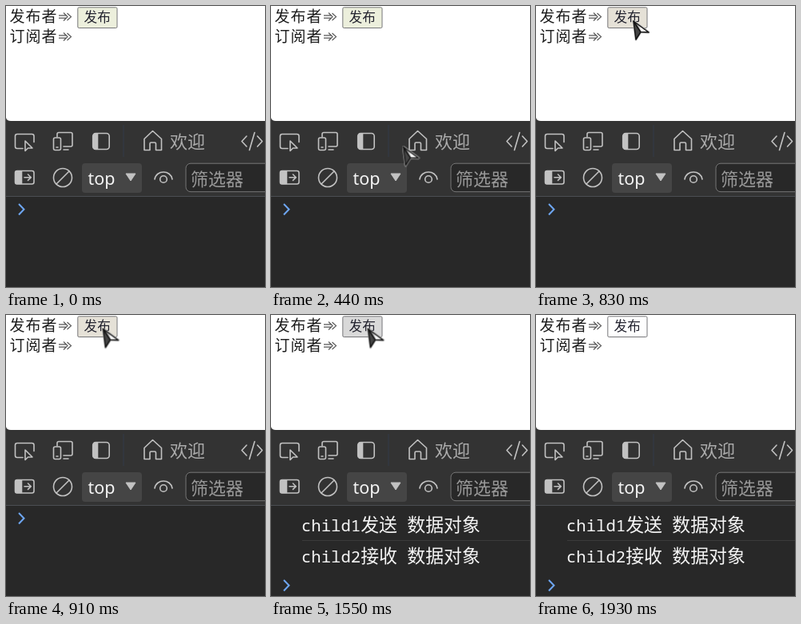
An HTML page for the animation above (3100 ms loop, 324 by 352 pixels).

```html
<!DOCTYPE html>
<html lang="zh-CN">
<head>
<meta charset="utf-8">
<title>Publish and subscribe</title>
<style>
html, body { margin: 0; width: 100%; height: 100%; overflow: hidden; background: #282828; }
svg { display: block; width: 324px; height: 352px; }
text { font-family: "Noto Sans CJK SC", "Noto Sans", sans-serif; }
.page { font-size: 19px; letter-spacing: 1px; fill: #1c1c1c; }
.icon { fill: none; stroke: #c2c2c2; stroke-width: 1.6; stroke-linejoin: round; stroke-linecap: round; }
.arrow { fill: none; stroke: #555; stroke-width: 1.1; }
.tab { font-size: 22px; fill: #acacac; }
.top { font: 500 21.5px "Noto Sans", "Open Sans", sans-serif; fill: #f4f4f4; }
.log { fill: #f4f4f4; font-size: 22.9px; font-weight: 500; }
.log .code { font: 500 20.6px "Noto Sans Mono", monospace; }

.button, .cursor, .logs, .prompt { animation: 3100ms step-end infinite; }
.button { animation-name: button; stroke: #77777a; }
.cursor { animation-name: cursor; }
.logs { animation-name: logs; }
.prompt { animation-name: prompt; }

@keyframes button {
  0% { fill: #ecefdc; }
  26.774% { fill: #e5e1d7; }
  44.838% { fill: #f9f8fa; }
  50% { fill: #d9d9d9; }
  57.096%, 100% { fill: #fefefe; }
}
@keyframes cursor {
  0% { transform: translate(400px, 400px); }
  9.677% { transform: translate(199px, 330px); }
  11.935% { transform: translate(182px, 254px); }
  14.193% { transform: translate(165.5px, 176.5px); }
  16.129% { transform: translate(155px, 126px); }
  18.709% { transform: translate(145px, 82px); }
  21.29% { transform: translate(138px, 53px); }
  24.193% { transform: translate(128px, 31px); }
  26.774% { transform: translate(122px, 19px); }
  29.354% { transform: translate(121.5px, 17.5px); }
  57.096% { transform: translate(168px, 92px); }
  59.677% { transform: translate(262px, 270px); }
  62.258%, 100% { transform: translate(400px, 400px); }
}
@keyframes logs {
  0% { visibility: hidden; }
  50%, 100% { visibility: visible; }
}
@keyframes prompt {
  0% { transform: translateY(0); }
  50%, 100% { transform: translateY(84px); }
}
</style>
</head>
<body>
<svg viewBox="0 0 324 352">
  <defs>
    <g id="fat-arrow" class="arrow">
      <path d="M66 -1.6H76M66 1.6H76M72 -5L77 0L72 5M76.5 -4.5L81.5 0L76.5 4.5"/>
    </g>
    <linearGradient id="shine">
      <stop offset=".15" stop-color="#777"/>
      <stop offset=".5" stop-color="#f6f6f6"/>
    </linearGradient>
  </defs>

  <!-- Page -->
  <rect width="324" height="150" fill="#fff"/>
  <text class="page" x="4.500" y="20">发布者</text>
  <use href="#fat-arrow" y="13.5"/>
  <text class="page" x="4.500" y="45">订阅者</text>
  <use href="#fat-arrow" y="38.5"/>
  <rect class="button" x="89.800" y="1.800" width="49.200" height="25.700" rx="1.5"/>
  <text x="97.500" y="20" font-size="16.700" fill="#22222e">发布</text>

  <!-- Developer tools -->
  <path d="M0 140Q1 144 6 144H324V352H0Z" fill="#333"/>
  <rect y="239" width="324" height="113" fill="#282828"/>
  <path d="M0 238.500H324" stroke="#4b4e53"/>
  <path d="M147 149V189" stroke="#333b4b"/>

  <g class="icon">
    <g transform="translate(0 .5)">
      <path d="M21 178H14Q11.500 178 11.500 175.500V162.500Q11.500 160 14 160H32.500Q35 160 35 162.500V170"/>
      <path d="M24 168.500V181L27.500 177.500H33Z"/>
    </g>
    <path d="M64 164V160.500Q64 158.500 66 158.500H81Q83 158.500 83 160.500V174Q83 176 81 176H72M72 180H78"/>
    <rect x="59.500" y="165" width="9" height="15.500" rx="2"/>
    <path d="M63 177H65"/>
    <rect x="108.700" y="159.500" width="20.500" height="20" rx="3.500"/>
    <path d="M109.700 162Q109.700 160 112.500 160H114.500V179H112.500Q109.700 179 109.700 177Z" fill="#c2c2c2"/>
    <path d="M173 166.500L183.500 156.500L194.500 166.500V180.500H187.500V172.500Q187.500 171 186 171H181.500Q180 171 180 172.500V180.500H173Z"/>
    <path d="M301 163L295 169.500L301 176M314.500 163L320.500 169.500L314.500 176M311 158.500L304.500 180.500"/>
    <rect x="11.500" y="206.500" width="23.500" height="16.500" rx="2.500"/>
    <path d="M12 208Q12 207 14 207H19.500V222.500H14Q12 222.500 12 221Z" fill="#c2c2c2"/>
    <path d="M23 214.700H31M27.500 211L31.300 214.700L27.500 218.400"/>
    <circle cx="71" cy="215" r="11.500"/>
    <path d="M63 223L79 207"/>
    <path d="M186 217C188 205 206 205 208 217"/>
    <circle cx="197" cy="217" r="4.300"/>
  </g>
  <text class="tab" x="205" y="178">欢迎</text>

  <rect x="95" y="197" width="75" height="37" rx="4" fill="#454545"/>
  <text class="top" x="102.500" y="224">top</text>
  <path d="M150 210H162L156 219Z" fill="#c2c2c2" stroke="#c2c2c2" stroke-linejoin="round"/>
  <rect x="225" y="197.200" width="110" height="35.500" rx="6" fill="#282828" stroke="#777"/>
  <text class="tab" x="231" y="225" style="fill:#999">筛选器</text>

  <!-- Console -->
  <g class="logs">
    <path d="M39 282.500H324" stroke="#3b3b3b"/>
    <text class="log" x="38" y="271"><tspan class="code">child1</tspan>发送<tspan class="code"> </tspan>数据对象</text>
    <text class="log" x="38" y="310"><tspan class="code">child2</tspan>接收<tspan class="code"> </tspan>数据对象</text>
  </g>
  <path class="prompt" d="M16 248L22.500 254.700L16 261.500" fill="none" stroke="#6ea6f2" stroke-width="2"/>

  <g class="cursor" stroke="#151515" stroke-width="1.500" stroke-linejoin="round">
    <path d="M0 0L19 14L9 13.500L3 23Z" fill="none" stroke="#bbb" stroke-width="2.800"/>
    <path d="M0 0L9 13.500L3 23Z" fill="#444"/>
    <path d="M0 0L19 14L9 13.500Z" fill="url(#shine)"/>
  </g>
</svg>
</body>
</html>
```
